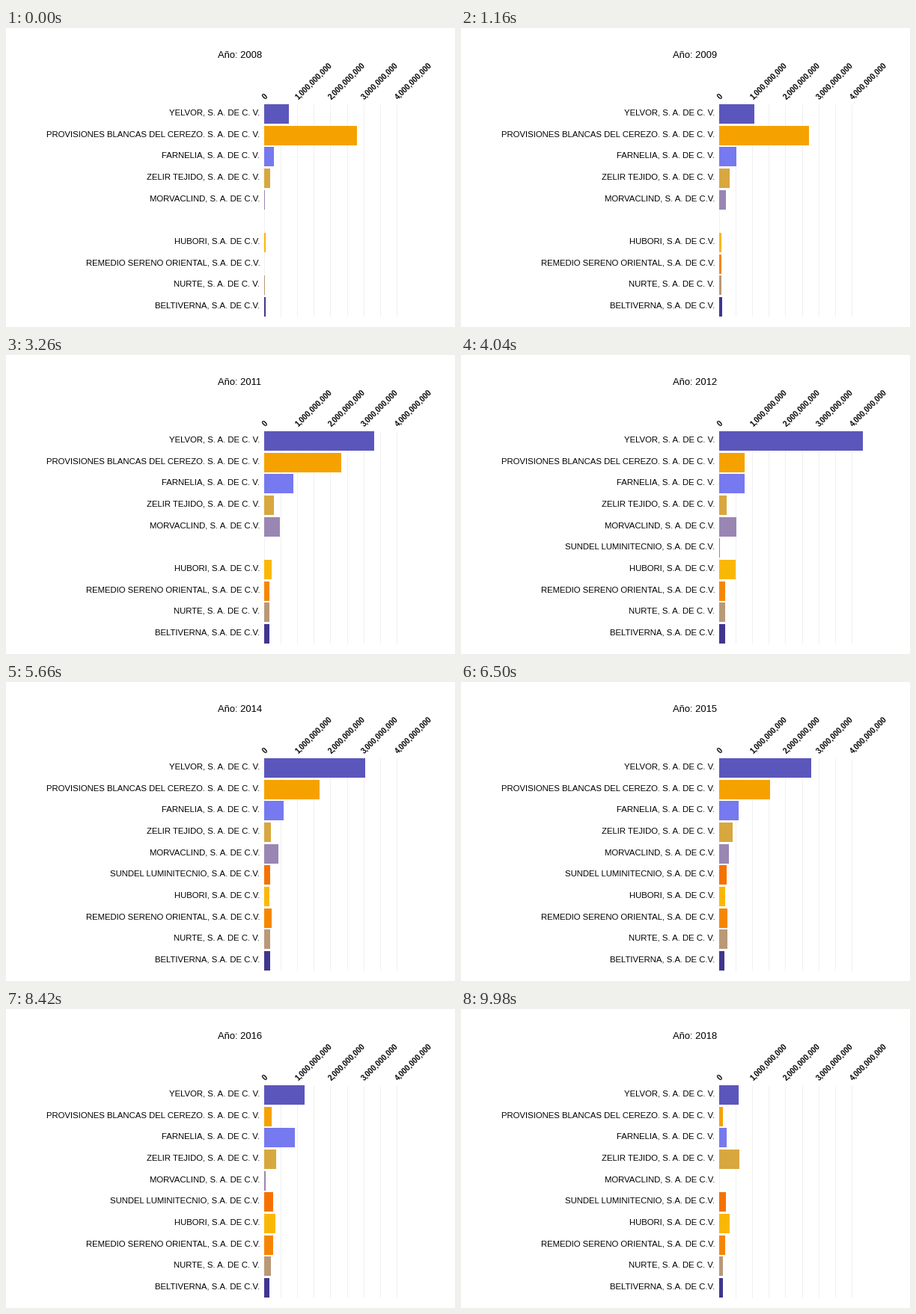
A matplotlib script that plays this animation: 600 px wide and 400 px high, repeating every 10 s.

```python
import matplotlib.pyplot as plt
import numpy as np
from matplotlib.animation import FuncAnimation
from matplotlib.patches import Rectangle

W, H, DPI = 600, 400, 100
FRAMES, INTERVAL = 500, 20
FIRST_YEAR, SPAN = 2008, 10
X0, BILLION = 345, 44.22         # axis origin and pixels per 1,000,000,000
TOP, PITCH, BAR_H = 102, 28.65, 26

# label, colour, turning points {years since start: bar length in pixels}
ROWS = [
    ("YELVOR, S. A. DE C. V.", "#5b56bc",
     {0: 33, 2: 57, 4: 199, 5: 63, 6: 170, 7: 79, 8: 71, 9: 32, 10: 26}),
    ("PROVISIONES BLANCAS DEL CEREZO. S. A. DE C. V.", "#f5a200",
     {0: 124, 1: 114, 2: 154, 3: 129, 4: 33, 6: 82, 7: 55, 8: 12, 10: 5}),
    ("FARNELIA, S. A. DE C. V.", "#7679ef",
     {0: 13, 3: 40, 6: 24, 7: 28, 8: 50, 10: 10}),
    ("ZELIR TEJIDO, S. A. DE C. V.", "#d8a73e",
     {0: 8, 2: 19, 4: 10, 6: 8.5, 7: 27.5, 9: 11, 10: 27}),
    ("MORVACLIND, S. A. DE C.V.", "#9986b3",
     {0: 0.8, 3: 21, 5: 24, 8: 3, 10: 0}),
    ("SUNDEL LUMINITECNIO, S.A. DE C.V.", "#f57200",
     {4: 0.8, 6: 9.5, 8: 12.5, 10: 9}),
    ("HUBORI, S.A. DE C.V.", "#fab806",
     {0: 2, 3: 5, 4: 23, 5: 6, 7: 8, 8: 15.5, 10: 14}),
    ("REMEDIO SERENO ORIENTAL, S.A. DE C.V.", "#f58700",
     {0: 0, 3: 7, 8: 12.5, 10: 8}),
    ("NURTE, S. A. DE C. V.", "#b99977",
     {0: 0.8, 4: 8, 6: 8.5, 7: 13, 10: 5}),
    ("BELTIVERNA, S.A. DE C.V.", "#3f368f",
     {0: 2, 4: 8, 8: 7, 10: 5}),
]

plt.rcParams["font.family"] = "Liberation Sans"
fig = plt.figure(figsize=(W / DPI, H / DPI), dpi=DPI, facecolor="white")
ax = fig.add_axes([0, 0, 1, 1])
ax.set_xlim(0, W)
ax.set_ylim(H, 0)
ax.axis("off")


def put_text(x, y, text, px, **style):
    return ax.text(x, y, text, fontsize=px * 72 / DPI, color="black",
                   va="baseline", **style)


grid_x = X0 + BILLION / 2 * np.arange(9)
ax.vlines(grid_x, TOP, 386, color="#f0f0f0", linewidth=72 / DPI, zorder=1)
for k in range(5):
    put_text(X0 + 1.5 + BILLION * k, 95.8, f"{k * 10**9:,}", 10,
             weight="bold", rotation=45, rotation_mode="anchor", ha="left")

title = put_text(283, 39.7, "", 13, ha="left")
bars, labels = [], []
for k, (name, color, _) in enumerate(ROWS):
    y = round(TOP + PITCH * k)
    bar = Rectangle((X0, y), 0, BAR_H, facecolor=color, linewidth=0,
                    snap=True, zorder=2)
    bars.append(ax.add_patch(bar))
    labels.append(put_text(339.3, y + 14.6, name, 11.4, ha="right"))


def update(i):
    elapsed = SPAN * i / (FRAMES - 1)
    title.set_text(f"Año: {FIRST_YEAR + round(elapsed)}")
    for bar, label, (_, _, points) in zip(bars, labels, ROWS):
        length = round(np.interp(elapsed, list(points), list(points.values())))
        started = elapsed >= min(points)
        bar.set_width(length)
        bar.set_visible(started and length > 0)
        label.set_visible(started)
    return [title, *bars, *labels]


anim = FuncAnimation(fig, update, frames=FRAMES, interval=INTERVAL,
                     repeat=True, repeat_delay=0)
plt.show()
```
